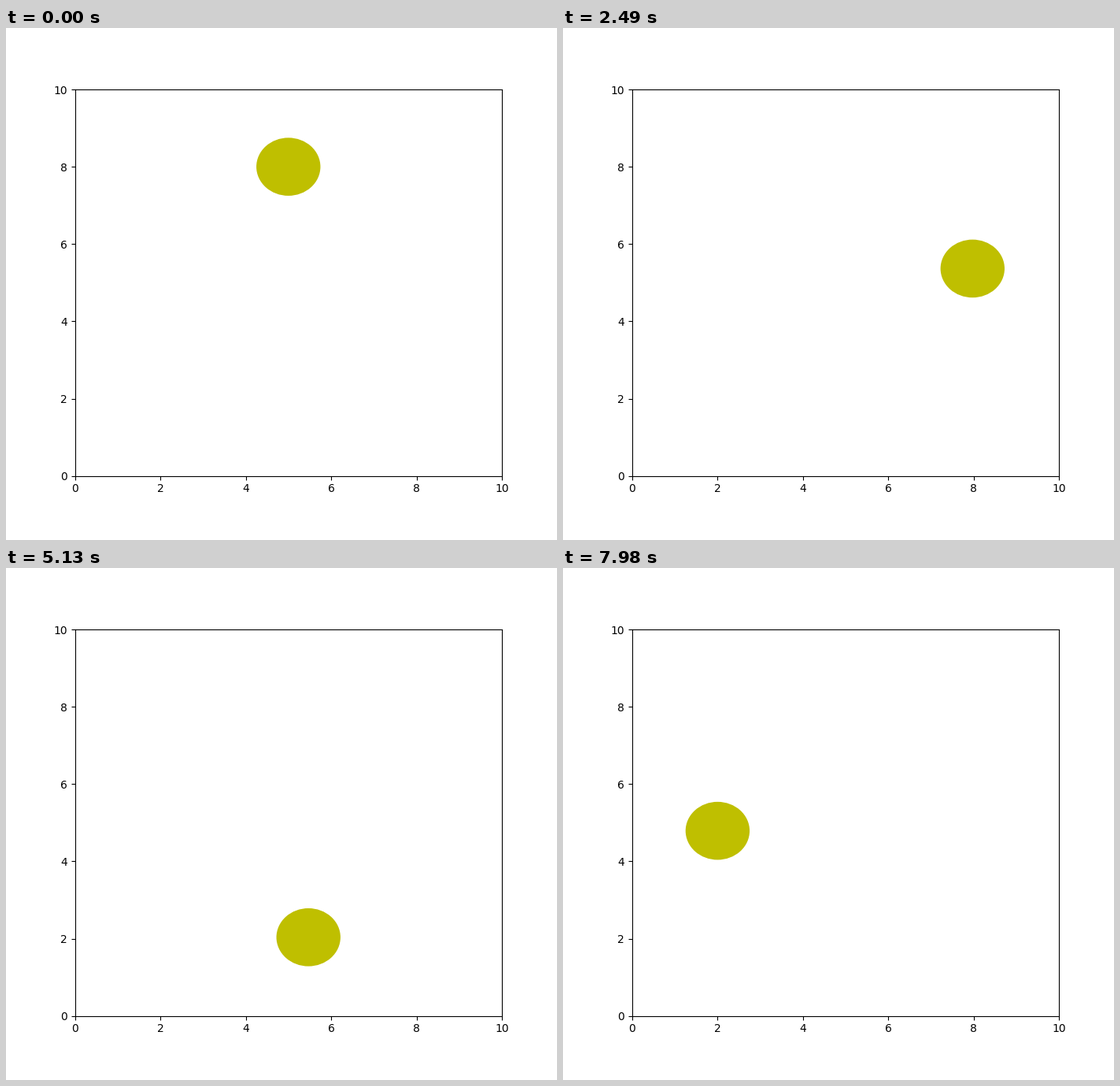
These frames come from a looping animation (700x650 px, 8000 ms). A matplotlib script:

```python
import math

import matplotlib.pyplot as plt
from matplotlib.animation import FuncAnimation

LOOP_MS = 8000
STEPS = 267
CENTER, ORBIT, RADIUS = 5, 3, 0.75

plt.rcParams["font.family"] = "DejaVu Sans"
fig = plt.figure(figsize=(7, 6.5), dpi=100)
fig.subplots_adjust(left=0.125, right=0.9, bottom=0.125, top=0.88)
ax = fig.add_subplot(xlim=(0, 10), ylim=(0, 10))

disc = plt.Circle((CENTER, CENTER + ORBIT), RADIUS, fc="y")
ax.add_patch(disc)


def update(step):
    """Move the disc clockwise from the top, one degree per step."""
    angle = math.radians(step)
    disc.center = (CENTER + ORBIT * math.sin(angle),
                   CENTER + ORBIT * math.cos(angle))
    return (disc,)


anim = FuncAnimation(fig, update, frames=STEPS, interval=LOOP_MS / STEPS,
                     blit=True, repeat=True, repeat_delay=0)
plt.show()
```
